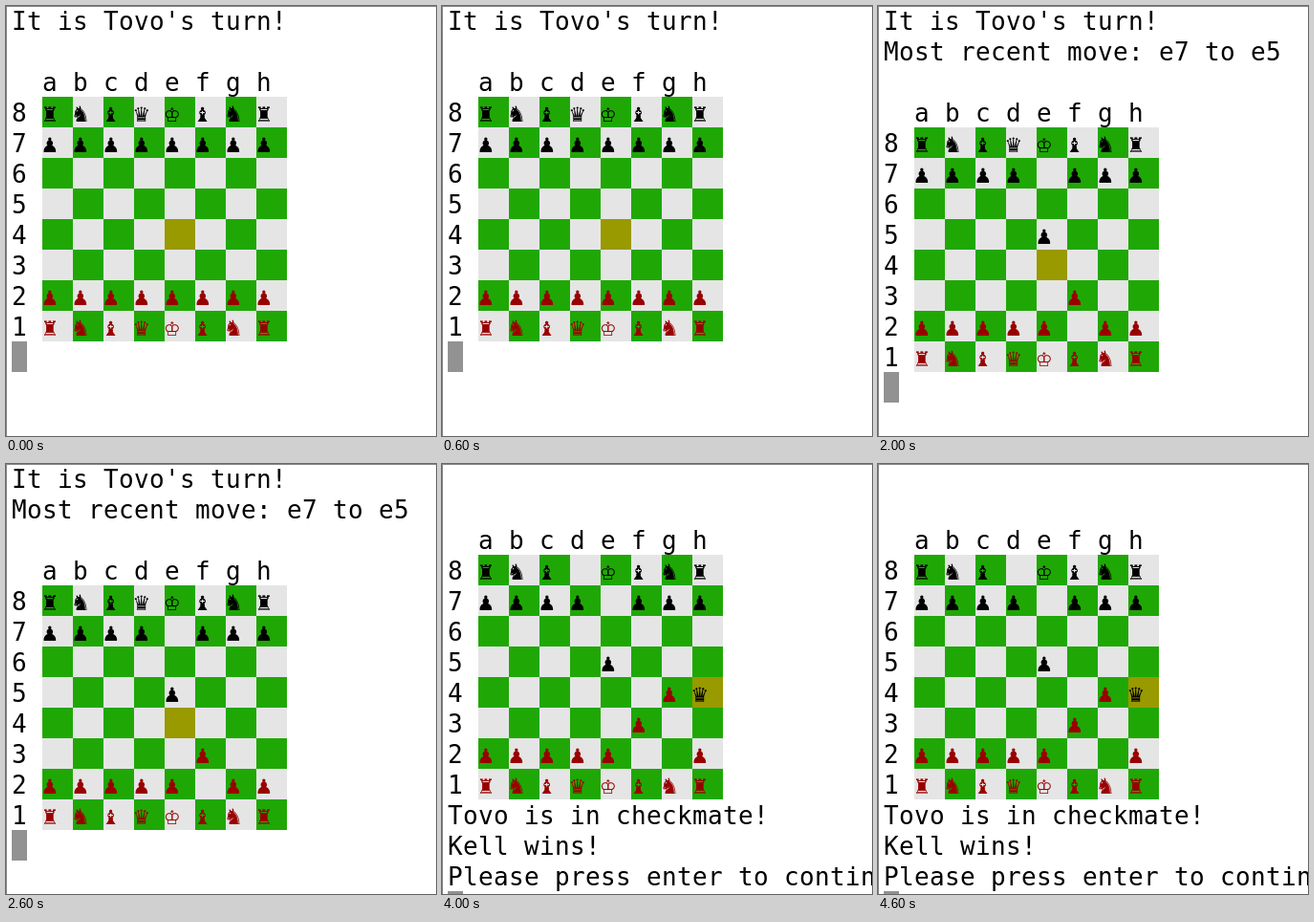
Animation, 450 px wide and 450 px high, one loop 5000 ms. Source, as an HTML page with a canvas:

```html
<!DOCTYPE html>
<html lang="en">
<head>
<meta charset="utf-8">
<title>Terminal chess</title>
<style>
  html, body { margin: 0; width: 100%; height: 100%; overflow: hidden; background: #fff; }
  canvas { display: block; }
</style>
</head>
<body>
<canvas id="stage" width="450" height="450"></canvas>
<script>
const ctx = document.getElementById('stage').getContext('2d');
const CELL = 16, LINE = 32, LEFT = 6, TOP = -1;
const COLORS = { dark: '#1fa805', light: '#e5e5e5', marked: '#999900', red: '#990000', cursor: '#929292' };
const GLYPHS = { r: '♜', n: '♞', b: '♝', q: '♛', k: '♔', p: '♟' };
const START = ['rnbqkbnr', 'pppppppp', '', '', '', '', 'PPPPPPPP', 'RNBQKBNR'];
const MOVES = ['f2 f3', 'e7 e5', 'g2 g4', 'd8 h4'];
const PLAYERS = ['Tovo', 'Kell'];

const square = name => [8 - name[1], name.charCodeAt(0) - 97];

function boardAfter(count) {
  const board = START.map(row => [...row.padEnd(8)]);
  for (const move of MOVES.slice(0, count)) {
    const [[r1, c1], [r2, c2]] = move.split(' ').map(square);
    board[r2][c2] = board[r1][c1];
    board[r1][c1] = ' ';
  }
  return board;
}

function rect(col, row, cols, color) {
  ctx.fillStyle = color;
  ctx.fillRect(LEFT + col * CELL, TOP + row * LINE, cols * CELL, LINE);
}

function print(text, row, col = 0, color = '#000') {
  ctx.fillStyle = color;
  [...text].forEach((ch, i) => ctx.fillText(ch, LEFT + (col + i) * CELL, TOP + row * LINE + 26));
}

function drawBoard(board, top, marked) {
  const [markRow, markCol] = square(marked);
  print('a b c d e f g h', top, 2);
  board.forEach((pieces, r) => {
    const row = top + 1 + r;
    print(String(8 - r), row);
    pieces.forEach((piece, c) => {
      const isMarked = r === markRow && c === markCol;
      const col = 2 + c * 2;
      rect(col, row, 2, isMarked ? COLORS.marked : (r + c) % 2 ? COLORS.light : COLORS.dark);
      if (piece === ' ') return;
      const kind = piece.toLowerCase();
      // The text selector keeps the pawn from turning into an emoji.
      ctx.fillStyle = piece === kind ? '#000' : COLORS.red;
      ctx.fillText(GLYPHS[kind] + '\uFE0E', LEFT + col * CELL, TOP + row * LINE + 26);
    });
  });
}

function draw(turn) {
  const over = turn === MOVES.length;
  const top = turn === 0 || over ? 2 : 3;
  ctx.fillStyle = '#fff';
  ctx.fillRect(0, 0, 450, 450);
  ctx.font = '26px "DejaVu Sans Mono", monospace';

  if (!over) {
    print(`It is ${PLAYERS[turn % 2]}'s turn!`, 0);
    if (turn) print('Most recent move: ' + MOVES[turn - 1].replace(' ', ' to '), 1);
  }
  drawBoard(boardAfter(turn), top, over ? 'h4' : 'e4');

  let row = top + 9;
  if (over) {
    print(`${PLAYERS[0]} is in checkmate!`, row++);
    print(`${PLAYERS[1]} wins!`, row++);
    print('Please press enter to continue', row++);
  }
  rect(0, row, 1, COLORS.cursor);

  // Window edge
  ctx.fillStyle = '#8c8c8c';
  ctx.fillRect(0, 0, 450, 1);
  ctx.fillRect(0, 0, 1, 450);
}

function tick() {
  draw(Math.floor(performance.now() / 1000) % (MOVES.length + 1));
  requestAnimationFrame(tick);
}
tick();
</script>
</body>
</html>
```
